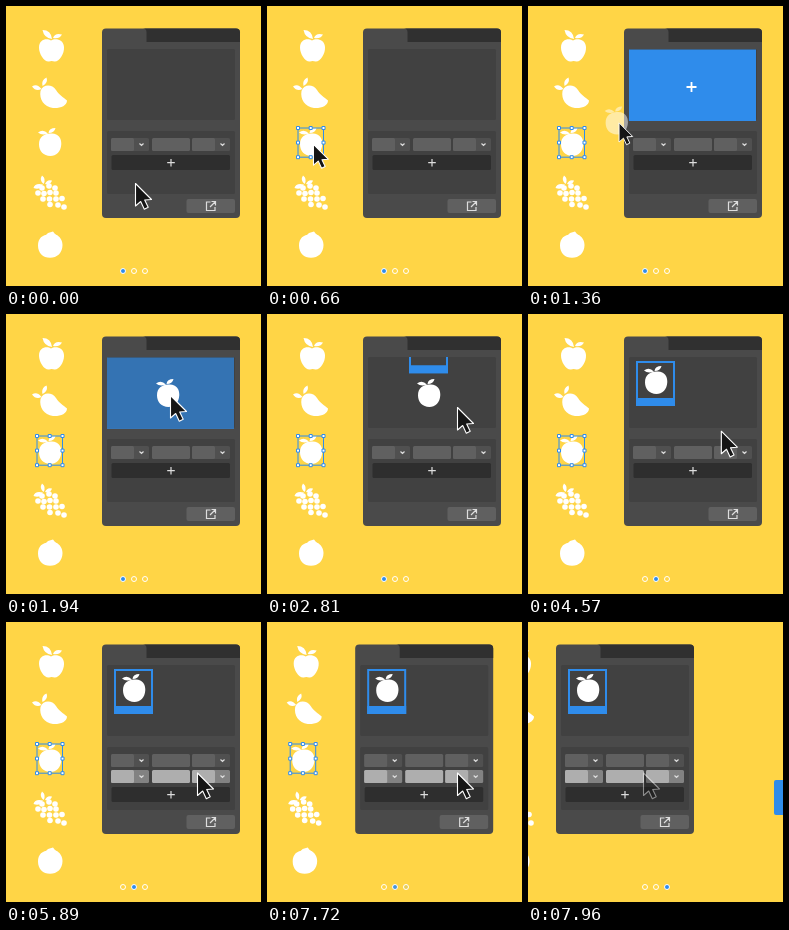
Animation of 255x280 px, one loop 7990 ms. Source, as an HTML page:

```html
<!DOCTYPE html>
<html lang="en">
<head>
<meta charset="utf-8">
<title>Adding fruit to a panel</title>
<style>
html, body { margin: 0; height: 100%; overflow: hidden; background: #ffd546; }
svg { display: block; width: 100vw; height: 100vh; }
.line { fill: none; stroke: #ddd; stroke-width: 1.2; }
</style>
</head>
<body>
<svg viewBox="0 0 255 280">
  <defs>
    <g id="plum">
      <path d="M44 127.6C52 126.500 55.500 132 55.300 138C55 146 50 150 44.500 150C37.500 150 33 145 33 138.500C33 131 38 128 44 127.600Z"/>
      <path d="M32 126.500Q37 122.500 42 127.600Q36 130 32 126.500ZM42.500 127Q43 122 49.500 122Q48.500 127 42.500 127Z"/>
    </g>
    <path id="chevron" d="M-2 -1L0 1L2 -1" class="line"/>
    <clipPath id="view"><path d="M101 43h128v71h-128z"/></clipPath>
  </defs>

  <g id="fruits" fill="#fff">
    <path d="M45 34.500C49 32 57.500 33 58 41C58.500 48 53 56 48.500 55.500Q45.500 54.500 43 55.500C38 56 33 48 33 41.500C33 33 41 32 45 34.500Z"/>
    <path d="M36.500 24Q45 24 46 33Q38 32 36.500 24ZM47 32Q49 26.500 56 28.500Q53 33.500 47 32Z"/>
    <path d="M34.500 85C37 78 46 78 50 84C53 89 57 91 61 94.500C61 100 54 102.500 47 102C38 101 33 93 34.500 85Z"/>
    <path d="M26 80.500Q31 77 35.500 83Q30 86 26 80.500ZM36.500 80Q35 74 40.500 71.500Q42.500 77 36.500 80Z"/>
    <path d="M27.500 182Q29 176.500 37 178.500Q34 184.500 27.500 182ZM37.500 178Q33 174 36 169.500Q40.500 173 37.500 178ZM39 178Q41 173 46 174.500Q45 179 39 178Z"/>
    <g id="grapes"></g>
    <path d="M44 228.500C51 227 56.500 232 56.500 239C56.500 247 51 251.800 44 251.800C37 251.800 32 247 32 239.500C32 232 37 228 44 228.500Z"/>
    <path d="M39 230L42 227L47 225.500L49 228L52 230Z"/>
  </g>

  <g id="picked">
    <use href="#plum" fill="#fff"/>
    <g id="selection" fill="#fff" stroke="#2f8ceb"><path fill="none" d="M31 122h25.500v29.200h-25.500z"/></g>
  </g>

  <g id="panel">
    <rect x="96" y="22.500" width="138" height="189.500" rx="4" fill="#4a4a4a"/>
    <path fill="#303030" d="M140.500 36V26Q140.500 22.500 137 22.500H230Q234 22.500 234 26.500V36Z"/>
    <g fill="#414141">
      <rect x="101" y="43" width="128" height="71" rx="1.500"/>
      <rect x="101" y="125" width="128" height="63" rx="1.500"/>
    </g>
    <g id="drop">
      <path fill="#2f8ceb" d="M101 43.500h127v71.500h-127z"/>
      <path d="M163.500 76v10M158.500 81h10" stroke="#fff" stroke-width="1.800"/>
    </g>
    <g clip-path="url(#view)">
      <g id="card" fill="none">
        <path d="M109 48h37v43h-37z" stroke="#2f8ceb" stroke-width="2"/>
        <path d="M108 84h39v8h-39z" fill="#2f8ceb"/>
      </g>
    </g>
    <use id="item" href="#plum" fill="#fff"/>
    <g id="bar">
      <rect id="barFill" x="105.500" y="149" width="118.500" height="15" rx="1.500" fill="#2e2e2e"/>
      <path d="M165 153v7.500M161.200 156.700h7.600" class="line"/>
    </g>
    <g id="row"></g>
    <g id="newRow"></g>
    <rect x="180.500" y="193" width="48.500" height="14" rx="2" fill="#606060"/>
    <path class="line" d="M204.500 196H200.500V204.500H209V201M205.500 195.500H209.500V199.500M209.500 195.500L204 201"/>
  </g>

  <rect id="next" x="314" y="158" width="60" height="35" rx="2" fill="#2f8ceb"/>
  <g id="dots" stroke="#fff"></g>
  <path id="cursor" d="M.5 .5V23L5.700 18.500L9.300 26.200L13.200 24.300L9.700 17L16.500 16.500Z" fill="#151515" stroke="#fff" stroke-width="1.100" stroke-linejoin="round"/>
</svg>
<script>
const LOOP = 7990;
const $ = id => document.getElementById(id);
const rect = (x, y, w, h, fill) =>
  `<rect x="${x}" y="${y}" width="${w}" height="${h}" rx="1.5" fill="${fill}"/>`;

const fields = (light, dark) =>
  rect(105, 132, 38, 13, dark) + rect(105, 132, 23, 13, light) +
  rect(146, 132, 38, 13, light) +
  rect(186, 132, 38, 13, dark) + rect(186, 132, 23, 13, light) +
  '<use href="#chevron" x="135.5" y="138.5"/><use href="#chevron" x="216.500" y="138.500"/>';
$('row').innerHTML = fields('#606060', '#505050');
$('newRow').innerHTML = fields('#aeaeae', '#828282');

const grapes = [[36, 182], [43, 180], [49, 182], [32, 187], [38, 187.5], [44, 186.5], [50, 187],
  [37, 193], [43.5, 193], [50, 193], [56, 192.500], [44, 198.500], [52, 199], [58, 201]];
$('grapes').innerHTML = grapes.map(([x, y]) => `<circle cx="${x}" cy="${y}" r="2.8"/>`).join('');

for (const x of [31, 43.7, 56.5])
  for (const y of [122, 136.6, 151.2])
    if (x !== 43.7 || y !== 136.6)
      $('selection').innerHTML += `<path d="M${x - 1.5} ${y - 1.5}h3v3h-3z"/>`;

$('dots').innerHTML = [117, 128, 139].map(x =>
  `<circle cx="${x}" cy="265" r="2.500" fill="#2f8ceb"/>`).join('');

const clamp = v => Math.min(1, Math.max(0, v));
const move = (id, x, y = 0, scale = 1) =>
  $(id).setAttribute('transform', `translate(${x} ${y}) scale(${scale})`);
const fade = (id, v) => $(id).setAttribute('opacity', v);

function draw(t) {
  const ease = (from, to) => {
    const p = clamp((t - from) / (to - from));
    return p * p * (3 - 2 * p);
  };
  const reach = ease(0, 600), drag = ease(1060, 1780);
  const leave = ease(2510, 2810), lower = ease(4240, 4990);
  const release = ease(1780, 1880), settle = ease(3250, 3520);
  const press = ease(5170, 5245) - ease(5245, 5320);
  const add = ease(5620, 5890), page = ease(4150, 4300);
  const slide = t < 7720 ? 0 : clamp((t - 7690) / 270);

  move('cursor',
    129 - 83 * reach + 118 * drag + 26 * leave + lower + 2.5 * Math.sin(Math.PI * lower) - 76 * slide ** 2,
    177 - 39 * reach - 57 * drag + 12 * leave + 57.5 * lower,
    1 - 0.15 * (ease(600, 720) - release + press));
  fade('cursor', 1 - 0.55 * slide ** 2);

  fade('selection', t >= 660 ? 1 : 0);
  fade('drop', ease(1120, 1330) - ease(1880, 2040));
  fade('item', t < 1090 ? 0 : 0.5 + 0.5 * release);
  move('item', 118 * drag - 34 * settle, -57 * drag - 13 * settle);
  move('card', 34 * (1 - settle), -49 + 62 * ease(2660, 3110) - 13 * settle);

  $('barFill').setAttribute('fill', `rgb(${Array(3).fill(46 + 40 * press)})`);
  move('bar', 0, 16 * add);
  move('newRow', 0, 16 * add);
  fade('newRow', add);

  move('fruits', -55 * slide);
  for (const id of ['picked', 'panel', 'next']) move(id, -68 * slide);
  [1 - page, page - slide, slide].forEach((v, i) =>
    $('dots').children[i].setAttribute('fill-opacity', clamp(v)));
}

function tick() {
  draw(performance.now() % LOOP);
  requestAnimationFrame(tick);
}
tick();
</script>
</body>
</html>
```
